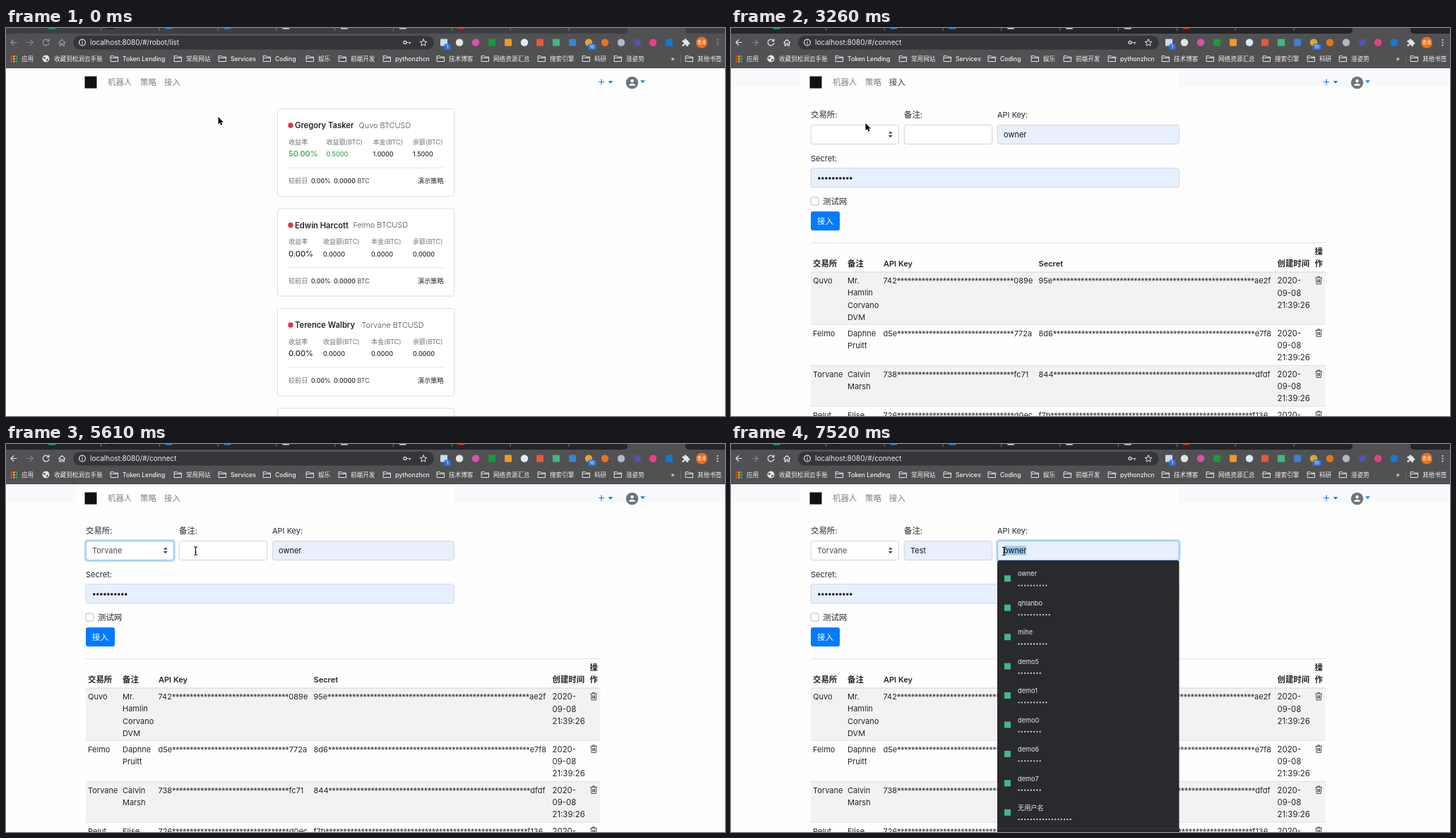
An HTML page that plays this animation: 1018x550 px, repeating every 8000 ms.

```html
<!DOCTYPE html>
<html lang="zh-CN">
<head>
<meta charset="utf-8">
<title>Trading robots</title>
<style>
html, body { margin: 0; width: 100%; height: 100%; overflow: hidden; background: #fefefe; }
svg { display: block; width: 1018px; height: 550px; }
text { font-family: Inter, "Noto Sans CJK SC", "Noto Sans CJK", sans-serif; white-space: pre; }
.stars { font-family: Roboto, sans-serif; font-size: 11.65px; }
.line { fill: none; stroke: #e4e5e7; stroke-width: 1.2; stroke-linecap: round; stroke-linejoin: round; }
.strip { fill: #242528; }
.blurred .strip { fill: #3d3e41; }
.blurred .dims { opacity: .5; }
</style>
</head>
<body>
<svg id="stage" viewBox="0 0 1018 550" xmlns="http://www.w3.org/2000/svg"></svg>
<script>
const INK = '#212529', MUTED = '#6c757d', GREEN = '#28a745', BLUE = '#007bff', RULE = '#dee2e6', FILLED = '#e8f0fe';
const stage = document.getElementById('stage');

// Markup helpers; text is placed by its left edge and vertical centre.
const text = (x, y, s, size = 11, fill = INK, weight = 400, extra = '') =>
  `<text x="${x}" y="${y}" dy=".365em" font-size="${size}" fill="${fill}" font-weight="${weight}" ${extra}>${s}</text>`;
const rect = (x, y, w, h, fill, r = 0, extra = '') =>
  `<rect x="${x}" y="${y}" width="${w}" height="${h}" fill="${fill}" rx="${r}" ${extra}/>`;
const circle = (x, y, r, fill, extra = '') => `<circle cx="${x}" cy="${y}" r="${r}" fill="${fill}" ${extra}/>`;
const path = (d, extra = '') => `<path d="${d}" ${extra}/>`;
const group = (id, body, extra = '') => `<g id="${id}" ${extra}>${body}</g>`;
const dots = (x, y, n, pitch, r, fill) =>
  Array.from({ length: n }, (_, i) => circle(x + i * pitch, y, r, fill)).join('');

function tabs() {
  const icons = ['#10a37f', '#16171a', '#2f7de1', '#2f7de1', '#d8d8d8', '#d8d8d8', '#d8d8d8', '#d0262d'];
  let s = path('M0 0H880V3Q880 8 874 8H0Z', 'class="strip"') + path('M962 0H1018V8H968Q962 8 962 3Z', 'class="strip"');
  icons.forEach((c, i) => s += rect(60 + i * 82.8, 0, 10, 1.5, c, .7));
  for (let i = 0; i < 9; i++) s += rect(134 + i * 82.8, 0, 1, 4, '#77787b');
  return s;
}

function toolbar() {
  const nav = path('M15 20.5H7M10.8 16.6L7 20.5L10.8 24.4', 'class="line"') +
    path('M60 17.6A4.4 4.4 0 1 0 60.9 21.5M61 15.6V18.6H58', 'class="line"') +
    path('M74.8 20.6L79.2 16.4L83.6 20.6M76 20V25H78V22H80.4V25H82.4V20', 'class="line"');
  const ext = [
    [620, '#c9d9f7', 1], [642, '#e4e4e4'], [665, '#dc4fb0'], [688, '#169b3f', 1], [711, '#f39a21', 1],
    [734, '#dbe9f6'], [756, '#e6583f', 1], [779, '#41b883', 1], [802, '#3f7fd0', 1], [825, '#e0a43a'],
    [848, '#e2761b'], [871, '#aebac4'], [894, '#5b51a3'], [916, '#ee3f86'], [939, '#1479d1', 1]
  ];
  let s = group('nav', nav, 'class="dims"') +
    path('M30 20.5H38M34.2 16.6L38 20.5L34.2 24.4', 'class="line" style="stroke:#858688"') +
    rect(95, 11, 511, 19.5, '#353639', 9.7) +
    circle(108, 20.5, 4.4, 'none', 'class="line"') + rect(107.5, 19.8, 1.1, 3.2, '#e4e5e7') + rect(107.5, 17.8, 1.1, 1.1, '#e4e5e7') +
    `<g id="url">${text(119, 20.5, '', 10, '#eeeeef')}</g>` +
    circle(565, 20.5, 2, 'none', 'stroke="#c9cacc" stroke-width="1.5"') + path('M567 20.5H573M571.5 20.5V22.6', 'class="line" style="stroke:#c9cacc"') +
    path('M591 15.8L592.4 19.2L596 19.4L593.2 21.7L594.1 25.2L591 23.3L587.9 25.2L588.8 21.7L586 19.4L589.6 19.2Z', 'class="line" style="stroke-width:1"');
  for (const [x, c, square] of ext) s += square ? rect(x - 5, 15.5, 10, 10, c, 1) : circle(x, 20.5, 5.2, c);
  s += rect(620.5, 22.5, 9, 8.5, '#2f73e0', 2) + text(623.6, 27, '1', 6.5, '#fff');
  s += rect(824, 22.5, 11.5, 8.5, '#2f73e0', 2) + text(826, 27, '10', 6.5, '#fff');
  s += path('M957.5 17.5H960.3A1.7 1.7 0 1 1 963.5 17.5H966V20A1.7 1.7 0 1 1 966 23.2V25.8H963A1.6 1.6 0 1 0 960.2 25.8H957.5V23A1.6 1.6 0 1 0 957.5 20.2Z', 'fill="#e4e5e7"');
  s += circle(985, 20.5, 8, '#e8711c') + text(978.6, 20.5, '青禾', 6.5, '#fff');
  s += group('more', [16.8, 20.5, 24.2].map(y => circle(1007.5, y, 1.05, '#e4e5e7')).join(''), 'class="dims"');
  return s;
}

function bookmarks() {
  const folders = [[165, 'Token Lending'], [255, '常用网站'], [318, 'Services'], [381, 'Coding'], [442, '娱乐'],
    [488, '前端开发'], [551, 'pythonzhcn'], [627, '技术博客'], [690, '网络资源汇总'], [770, '搜索引擎'],
    [833, '科研'], [878, '涨姿势'], [979, '其他书签']];
  const label = (x, s) => text(x, 43.5, s, 8.6, '#f1f1f2', 500);
  const colors = ['#e94335', '#fbbc05', '#34a853', '#4285f4'];
  let s = '';
  for (let i = 0; i < 9; i++)
    s += rect(6.5 + i % 3 * 3.6, 39 + Math.floor(i / 3) * 3.6, 2.4, 2.4, colors[(i + Math.floor(i / 3)) % 4]);
  s += label(22, '应用') + circle(56.5, 43.5, 5, '#e4e5e7') +
    path('M53 41L56 41.5L55.5 43.5L53.2 44ZM57.5 44L60 43.4L59.3 46.2L57 47Z', 'fill="#505153"') + label(68, '收藏到松涧云手账');
  for (const [x, name] of folders)
    s += path(`M${x - 16.5} 39.5H${x - 12.8}L${x - 11.4} 41H${x - 6.5}V47.5H${x - 16.5}ZM${x - 16.5} 42.3H${x - 6.5}`, 'class="line" style="stroke-width:1"') + label(x, name);
  return s + label(941.5, '»') + rect(955, 38, 1, 11, '#6c6d70');
}

function header() {
  const caret = (x, y) => path(`M${x - 3.4} ${y - 1.7}H${x + 3.4}L${x} ${y + 1.9}Z`, `fill="${BLUE}"`);
  return rect(111.5, 68.5, 17, 17, '#111') +
    text(144, 77, '机器人', 11.4, '#7f7f7f') + text(190, 77, '策略', 11.4, '#7f7f7f') +
    text(224, 77, '接入', 11.4, '#7f7f7f', 400, 'id="link"') +
    path('M839 76.5H847M843 72.5V80.5', `stroke="${BLUE}" stroke-width="1.2"`) + caret(856, 76.8) +
    circle(886.5, 77.5, 8.7, MUTED) + circle(886.5, 75, 2.3, '#fff') +
    path('M882 81.7C882 77.6 891 77.6 891 81.7Z', 'fill="#fff"') + caret(901.5, 76);
}

function card(i, name, exX, exchange, cols, values) {
  const names = ['收益率', '收益额(BTC)', '本金(BTC)', '余额(BTC)'];
  let s = rect(384.5, 114.5, 250, 124, '#fff', 3, 'stroke="#dcdcdd"');
  if (name) {
    s += circle(403, 138, 3.7, '#dc3545') + text(409, 138, name, 11.2, INK, 600) +
      text(exX, 138, exchange + ' BTCUSD', 10.9, '#4a4f54', 300);
    names.forEach((n, k) => s += text(cols[k], 161.5, n, 9.1, MUTED));
    values.forEach((v, k) => {
      const fill = i === 0 && k < 2 ? GREEN : INK;
      s += k ? text(cols[k], 179, v, 8.9, fill, 500) : text(cols[k], 178, v, 11, fill, 500);
    });
    s += rect(400, 197.7, 220, 1, '#e4e4e5') + text(400, 217, '较前日', 9.1, MUTED) +
      text(432, 217, '0.00%', 8.7, INK, 500) + text(464, 217, '0.0000', 8.9, INK, 500) +
      text(497.5, 217, 'BTC', 8.9, '#44494e') + text(583, 217, '演示策略', 9.15, INK, 500);
  }
  return `<g transform="translate(0 ${i * 141.5})">${s}</g>`;
}

function listPage() {
  const zero = ['0.00%', '0.0000', '0.0000', '0.0000'], cols = [400, 449, 517, 576];
  return card(0, 'Gregory Tasker', 499.5, 'Quvo', [400, 453.5, 519.5, 576], ['50.00%', '0.5000', '1.0000', '1.5000']) +
    card(1, 'Edwin Harcott', 491.5, 'Felmo', cols, zero) +
    card(2, 'Terence Walbry', 503.5, 'Torvane', cols, zero) + card(3);
}

const field = (x, y, w, fill, id = '') => rect(x, y, w, 27, fill, 3, `stroke="#ced4da" id="${id}"`);

function form() {
  return text(113, 123, '交易所:', 11.4) + text(245, 123, '备注:', 11.4) + text(377, 123, 'API Key:') +
    field(113, 137.5, 124.5, '#fff') + field(245.3, 137.5, 124.5, '#fff', 'note') + field(377.3, 137.5, 257, FILLED) +
    path('M223 149.6L225.8 146.4L228.6 149.6ZM223 152L225.8 155.2L228.6 152Z', 'fill="#343a40"') +
    text(113, 184.5, 'Secret:') + field(113, 198.7, 521.3, FILLED) + dots(124.8, 213, 10, 5, 1.75, '#111') +
    rect(113, 240, 11, 11, '#fff', 2.5, 'stroke="#adb5bd"') + text(130, 246, '测试网', 11.4) +
    rect(113, 260, 41, 27, BLUE, 3) + text(122, 273.5, '接入', 11.4, '#fff');
}

function table() {
  const rows = [
    [346, 74.5, 'Quvo', ['Mr.', 'Hamlin', 'Corvano', 'DVM'], '742', '089e', '95e', 'ae2f'],
    [420.5, 58, 'Felmo', ['Daphne', 'Pruitt'], 'd5e', '772a', '8d6', 'e7f8'],
    [478.5, 58, 'Torvane', ['Calvin', 'Marsh'], '738', 'fc71', '844', 'dfdf'],
    [536.5, 58, 'Pelut', ['Elise'], '726', 'd0ec', 'f7b', 'f136']
  ];
  const masked = (a, n, b) => `${a}<tspan class="stars">${'*'.repeat(n)}</tspan>${b}`;
  const bold = (x, y, s, size = 11.4) => text(x, y, s, size, INK, 600);
  let s = rect(113, 304, 728.5, 1, RULE) + bold(116, 334, '交易所') + bold(165, 334, '备注') + bold(216, 334, 'API Key', 11) +
    bold(435.5, 334, 'Secret', 11) + bold(773.5, 334, '创建时间') + bold(826.5, 317, '操') + bold(826.5, 334, '作');
  rows.forEach(([y, h, ex, names, a, b, c, d], i) => {
    const m = y + 12.3, bin = y + 6;
    s += rect(113, y, 728.5, h, i % 2 ? '#fefefe' : '#f2f2f2') + rect(113, y - .7, 728.5, i ? 1 : 1.5, RULE) + text(116, m, ex);
    names.forEach((n, k) => s += text(165, m + k * 17.15, n));
    s += text(215.5, m, masked(a, 33, b)) + text(435.5, m, masked(c, 57, d));
    ['2020-', '09-08', '21:39:26'].forEach((n, k) => s += text(773.5, m + k * 17.15, n, 11.4));
    s += path(`M827.4 ${bin + 2}H836.8M830.5 ${bin + 1.6}V${bin + .4}H833.7V${bin + 1.6}M828.4 ${bin + 2.4}L829 ${bin + 11}H835.2L835.8 ${bin + 2.4}M830.7 ${bin + 4.2}V${bin + 9}M832.1 ${bin + 4.2}V${bin + 9}M833.5 ${bin + 4.2}V${bin + 9}`,
      `fill="none" stroke="${INK}" stroke-width=".8"`);
  });
  return s;
}

function menu() {
  const names = ['Pelut', 'Quvo', 'Torvane', 'Felmo'];
  return rect(105.5, 140.5, 126, 69.5, '#797a7b', 4.5, 'stroke="#6a6b6c" style="filter:drop-shadow(0 3px 4px #0005)"') +
    rect(105.5, 142.5, 126, 16, '#4b9df8', 0, 'id="hover"') +
    path('M110.6 151L112.4 153.4L115.6 148.2', 'fill="none" stroke="#fff" stroke-width="1.2"') +
    names.map((n, i) => text(121, 150.5 + i * 15.7, n, 11, '#fff', 500)).join('');
}

function notePopup() {
  return rect(245, 165, 130, 158, '#292a2d', 3) +
    ['Test', 'test1', 'test2', 'demo'].map((n, i) => text(254, 180 + i * 23, n, 9.2, '#e8eaed')).join('');
}

function loginPopup() {
  const items = [['owner', 10], ['qhlanbo', 11], ['mihe', 10], ['demo5', 8], ['demo1', 10], ['demo0', 8], ['demo6', 8], ['demo7', 8], ['无用户名', 18]];
  let s = rect(377, 165, 257.5, 390, '#292a2d', 3);
  items.forEach(([n, count], i) => {
    const y = 184 + i * 41.45;
    s += rect(387, y + 2.2, 9, 9, '#41b883') + text(406, y, n, 9.2, '#e8eaed') + dots(407.6, y + 16.6, count, 4.3, 1.15, '#d4d6d9');
  });
  return s + rect(377, 545, 257.5, 5, '#2d2530') + rect(377, 544.5, 257.5, 1, '#3f4043');
}

const pointer = 'stroke="#fff" stroke-width="1" stroke-linejoin="round" paint-order="stroke"';
const cursors =
  group('arrow', path('M0 0V10.3L2.4 8.1L4 11.8L5.9 11L4.3 7.4H7.4Z', `fill="#000" ${pointer}`)) +
  group('hand', path('M-1.2 .6Q0-1 1.2 .6V4.4Q2.6 3.6 3.2 4.8Q4.8 4.2 5.2 5.5Q6.8 5.2 6.8 7V8.6L5.5 12H-.4L-3.6 7.6Q-3.9 6-2.5 6.2L-1.2 7.4Z', 'fill="#fff" stroke="#000" stroke-width="1"') +
    path('M1.4 7.8V10.4M3.2 7.8V10.4', 'stroke="#000" stroke-width=".7"')) +
  group('beam', path('M-2.4-5.6Q0-5.6 0-4.4Q0-5.6 2.4-5.6M0-4.6V4.8M-2.4 5.8Q0 5.8 0 4.6Q0 5.8 2.4 5.8M-1.2 1.6H1.2', 'fill="none" stroke="#111" stroke-width="1.1"'));

stage.innerHTML =
  rect(0, 0, 1018, 550, '#fefefe') + rect(0, 0, 1018, 57, '#505153') + tabs() + toolbar() + bookmarks() + rect(0, 56, 1018, 1, '#434447') +
  group('bandLeft', rect(0, 57, 98, 26, '#f8f9fb')) + group('bandMid', rect(98, 57, 536, 26, '#f8f9fb')) + group('bandRight', rect(634, 57, 384, 26, '#f8f9fb')) +
  header() + group('list', listPage()) +
  group('connect', form() +
    group('ring', rect(0, 136.2, 0, 29.6, 'none', 4, 'stroke="#bfdeff" stroke-width="2.2"') + rect(0, 137.5, 0, 27, 'none', 3, 'stroke="#80bdff"')) +
    rect(386, 144.5, 0, 13, '#9cc8f3', 0, 'id="marked"') +
    text(122, 151, 'Torvane', 11, '#495057', 400, 'id="picked"') + text(254, 151, 'Test', 11, '#111', 400, 'id="typed"') + text(386, 151, 'owner', 11, '#111') +
    table() + group('menu', menu()) + group('notes', notePopup()) + group('logins', loginPopup())) +
  group('cursor', cursors);

const $ = id => document.getElementById(id);
const show = (id, on) => { $(id).style.display = on ? '' : 'none'; };

// Pointer path: [tick, x, y]
const route = [[-1, 300.5, 126], [7, 232, 78], [11, 232, 78], [13, 229.5, 79.5], [17, 229.5, 79.5], [19, 190.5, 135],
  [21, 177, 149], [24, 177, 149], [26, 175.5, 167], [29, 170, 181], [32, 170, 181], [35, 268.5, 151.5], [36, 268.5, 151.5],
  [39, 275, 173], [41, 275, 173], [44, 429, 152], [45, 429, 152], [48, 386.5, 152]];

function pointerAt(n) {
  const i = Math.max(1, route.findIndex(p => p[0] >= n));
  const [a, x0, y0] = route[i - 1], [b, x1, y1] = route[i];
  const u = (n - a) / (b - a), k = u * u * (3 - 2 * u);
  return [x0 + (x1 - x0) * k, y0 + (y1 - y0) * k];
}

function focusRing(x, w) {
  show('ring', w);
  const [outer, inner] = $('ring').children;
  outer.setAttribute('x', x - 1.3);
  outer.setAttribute('width', w + 2.6);
  inner.setAttribute('x', x);
  inner.setAttribute('width', w);
}

function render(n) {
  const during = (a, b = 99) => n >= a && n < b;
  const [x, y] = pointerAt(n), connected = during(14);
  stage.classList.toggle('blurred', n < 9);
  $('url').firstChild.textContent = 'localhost:8080/#/' + (connected ? 'connect' : 'robot/list');
  $('link').setAttribute('fill', during(9, 20) ? '#3f3f3f' : '#7f7f7f');
  show('bandLeft', during(9));
  show('bandMid', during(9, 14));
  show('bandRight', during(9));
  show('list', !connected);
  show('connect', connected);

  show('menu', during(21, 32));
  $('hover').setAttribute('y', 142.5 + 15.7 * (n < 27 ? 0 : n < 29 ? 1 : 2));
  show('picked', during(32));
  show('typed', during(40));
  $('note').setAttribute('fill', during(40) ? FILLED : '#fff');
  show('notes', during(37, 40));
  show('logins', during(46));
  $('marked').setAttribute('width', during(46) ? Math.max(0, 418.5 - Math.max(386, x)) : 0);
  if (during(20, 36)) focusRing(113, 124.5);
  else if (during(36, 45)) focusRing(245.3, 124.5);
  else if (during(45)) focusRing(377.3, 257);
  else focusRing(0, 0);

  const kind = during(11, 18) ? 'hand' : during(34, 38) || during(43) ? 'beam' : 'arrow';
  ['arrow', 'hand', 'beam'].forEach(id => show(id, id === kind));
  $('cursor').setAttribute('transform', `translate(${x} ${y})`);
}

let last;
function frame() {
  const t = performance.now() % 8000;
  const n = Math.max(-1, Math.min(48, Math.floor((t - 437) / 147.5)));
  if (n !== last) render(last = n);
  requestAnimationFrame(frame);
}
frame();
</script>
</body>
</html>
```
